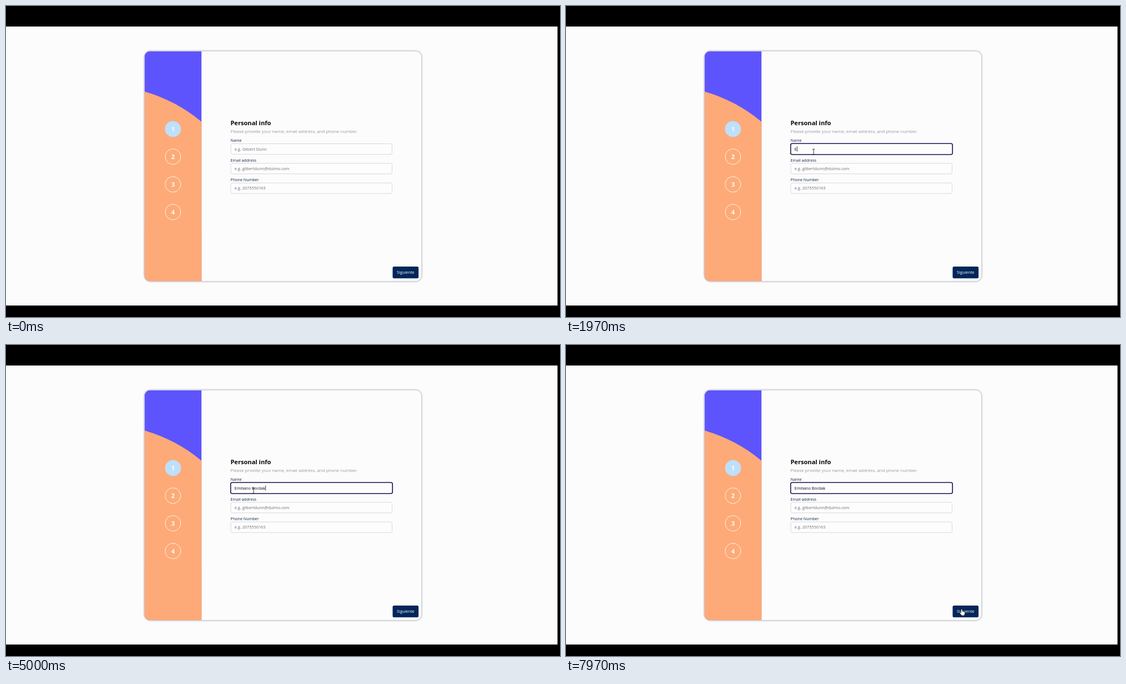
An HTML page with a canvas that plays this animation: 998x561 px, repeating every 8 s.

```html
<!DOCTYPE html>
<html lang="en">
<head>
<meta charset="utf-8">
<title>Multi-step form</title>
<style>
  html, body { margin: 0; width: 100%; height: 100%; overflow: hidden; background: #000; }
  canvas { display: block; }
</style>
</head>
<body>
<canvas id="stage" width="998" height="561"></canvas>
<script>
const ctx = document.getElementById('stage').getContext('2d');
const LOOP = 8000;
const BLINK = 600;
const FOCUS_AT = 1400;
const NAME = 'Emiliano Bordak';
const KEY_TIMES = [1880, 2600, 2780, 2940, 3100, 3280, 3450, 3560, 3700, 3900, 4190, 4380, 4530, 4690, 4850];

const WHITE = '#fcfcfc';
const NAVY = '#03265a';
const FONT = '"Open Sans", "Noto Sans", sans-serif';
const CARD = { x: 249.5, y: 81.5, w: 499, h: 415, r: 11 };
const FIELDS = [
  { y: 248.5, label: 'Name', hint: 'e.g. Gilbert Dunn' },
  { y: 283.8, label: 'Email address', hint: 'e.g. gilbertdunn@dulmo.com' },
  { y: 319.2, label: 'Phone Number', hint: 'e.g. 2075550163' }
];
const BUTTON = { x: 696.5, y: 470, w: 46.7, h: 21.3 };

// Pointer path: time, x, y
const PATH = [
  [790, 918, 330], [870, 722, 300], [1040, 540, 274], [1250, 446, 263],
  [5930, 446, 263], [6230, 523, 300.5], [6700, 608, 376], [7250, 714, 482]
];

function text(str, x, y, size, color, weight = 400, align = 'left') {
  ctx.font = `${weight} ${size}px ${FONT}`;
  ctx.textAlign = align;
  ctx.fillStyle = color;
  ctx.fillText(str, x, y);
}

function roundRect(x, y, w, h, r) {
  ctx.beginPath();
  ctx.roundRect(x, y, w, h, r);
}

function polygon(points) {
  ctx.beginPath();
  points.forEach(([x, y]) => ctx.lineTo(x, y));
  ctx.closePath();
}

function drawCard() {
  const { x, y, w, h, r } = CARD;
  ctx.save();
  ctx.shadowColor = 'rgba(80, 80, 120, 0.85)';
  ctx.shadowBlur = 3;
  ctx.fillStyle = WHITE;
  roundRect(x, y, w, h, r);
  ctx.fill();
  ctx.restore();

  ctx.save();
  roundRect(x, y, w, h, r);
  ctx.clip();
  ctx.beginPath();
  ctx.rect(x, y, 352.3 - x, h);
  ctx.clip();
  ctx.fillStyle = '#5d54fe';
  ctx.fillRect(x, y, 103, h);
  ctx.fillStyle = '#fdaa78';
  ctx.beginPath();
  ctx.arc(173, 421.5, 278, 0, Math.PI * 2);
  ctx.fill();
  ctx.fillRect(x, 400, 103, 100);
  ctx.restore();
}

function drawSteps() {
  for (let i = 0; i < 4; i++) {
    const y = 221.9 + i * 49.9;
    ctx.beginPath();
    ctx.arc(300.8, y, i ? 14 : 14.4, 0, Math.PI * 2);
    if (i) {
      ctx.strokeStyle = '#fff4ec';
      ctx.lineWidth = 1;
      ctx.stroke();
    } else {
      ctx.fillStyle = '#bee0fc';
      ctx.fill();
    }
    text(i + 1, 300.8, y + 4, 11, '#fff', 700, 'center');
  }
}

function drawField({ y, label, hint }, focused, value) {
  text(label, 404.6, y - 3.1, 7.15, '#14284a');
  roundRect(405, y, 290.5, 19, 2.5);
  ctx.fillStyle = '#fdfdfd';
  ctx.fill();
  ctx.strokeStyle = '#d8d8e0';
  ctx.lineWidth = 1;
  ctx.stroke();
  if (focused) {
    roundRect(404.7, y - 0.5, 291.6, 20, 3);
    ctx.strokeStyle = '#1d1958';
    ctx.lineWidth = 1.6;
    ctx.stroke();
  }
  if (value) text(value, 411.6, y + 12, 7.3, '#0c0c14', 500);
  else text(hint, 411.8, y + 12, 7.3, '#6d6d75');
}

function drawCaret(t, value) {
  const typed = KEY_TIMES.filter(k => k <= t);
  const since = t - (typed.length ? typed[typed.length - 1] : FOCUS_AT);
  if (Math.floor(since / BLINK) % 2) return;
  ctx.font = `500 7.3px ${FONT}`;
  ctx.fillStyle = '#111';
  ctx.fillRect(411.8 + ctx.measureText(value).width, 253.2, 0.8, 9.4);
}

function pointerAt(t) {
  if (t < PATH[0][0]) return null;
  const i = PATH.findIndex(p => p[0] > t);
  if (i < 0) return PATH[PATH.length - 1].slice(1);
  const [t0, x0, y0] = PATH[i - 1];
  const [t1, x1, y1] = PATH[i];
  const k = (t - t0) / (t1 - t0);
  return [x0 + (x1 - x0) * k, y0 + (y1 - y0) * k];
}

function drawBeam() {
  ctx.strokeStyle = '#222';
  ctx.lineWidth = 0.9;
  ctx.beginPath();
  ctx.moveTo(0, -4.5);
  ctx.lineTo(0, 4.5);
  for (const y of [-4.7, 4.7]) {
    ctx.moveTo(-2.3, y);
    ctx.lineTo(2.3, y);
  }
  ctx.stroke();
}

function drawArrow() {
  polygon([[0, 0], [0, 9.5], [2.3, 7.4], [3.9, 10.8], [5.4, 10.1], [3.9, 6.9], [6.8, 6.7]]);
  ctx.fillStyle = '#111';
  ctx.strokeStyle = '#fff';
  ctx.lineWidth = 0.8;
  ctx.fill();
  ctx.stroke();
}

function drawHand() {
  polygon([
    [-2, -5], [-0.6, -5], [-0.3, -1.4], [3.6, -0.4], [4.5, 0.8],
    [4, 3.4], [3, 5.7], [-1, 5.7], [-4.3, 1.7], [-3.8, 0.6], [-2.1, 1.5]
  ]);
  ctx.lineJoin = 'round';
  ctx.strokeStyle = '#10182c';
  ctx.lineWidth = 1.3;
  ctx.stroke();
  ctx.fillStyle = '#fff';
  ctx.fill();
}

function drawPointer(t) {
  const pos = pointerAt(t);
  if (!pos) return;
  const [x, y] = pos;
  const inside = (left, top, w, h) => x >= left && x <= left + w && y >= top && y <= top + h;
  ctx.save();
  ctx.translate(x, y);
  if (inside(BUTTON.x, BUTTON.y, BUTTON.w, BUTTON.h)) drawHand();
  else if (FIELDS.some(f => inside(405, f.y, 290.5, 19))) drawBeam();
  else drawArrow();
  ctx.restore();
}

function draw(t) {
  const value = NAME.slice(0, KEY_TIMES.filter(k => k <= t).length);
  const focused = t >= FOCUS_AT;

  ctx.fillStyle = '#000';
  ctx.fillRect(0, 0, 998, 561);
  ctx.fillStyle = WHITE;
  ctx.fillRect(0, 37, 993.5, 503.3);

  drawCard();
  drawSteps();
  text('Personal info', 404.4, 215, 11.1, '#08080c', 700);
  text('Please provide your name, email address, and phone number.', 404.6, 229, 7.94, '#97979c');
  FIELDS.forEach((f, i) => drawField(f, focused && i === 0, i === 0 ? value : ''));
  if (focused) drawCaret(t, value);

  roundRect(BUTTON.x, BUTTON.y, BUTTON.w, BUTTON.h, 2.5);
  ctx.fillStyle = NAVY;
  ctx.fill();
  text('Siguiente', 719.8, 483.2, 7.35, '#fff', 500, 'center');
  drawPointer(t);
}

const start = performance.now();
function tick() {
  draw((performance.now() - start) % LOOP);
  requestAnimationFrame(tick);
}
tick();
</script>
</body>
</html>
```
